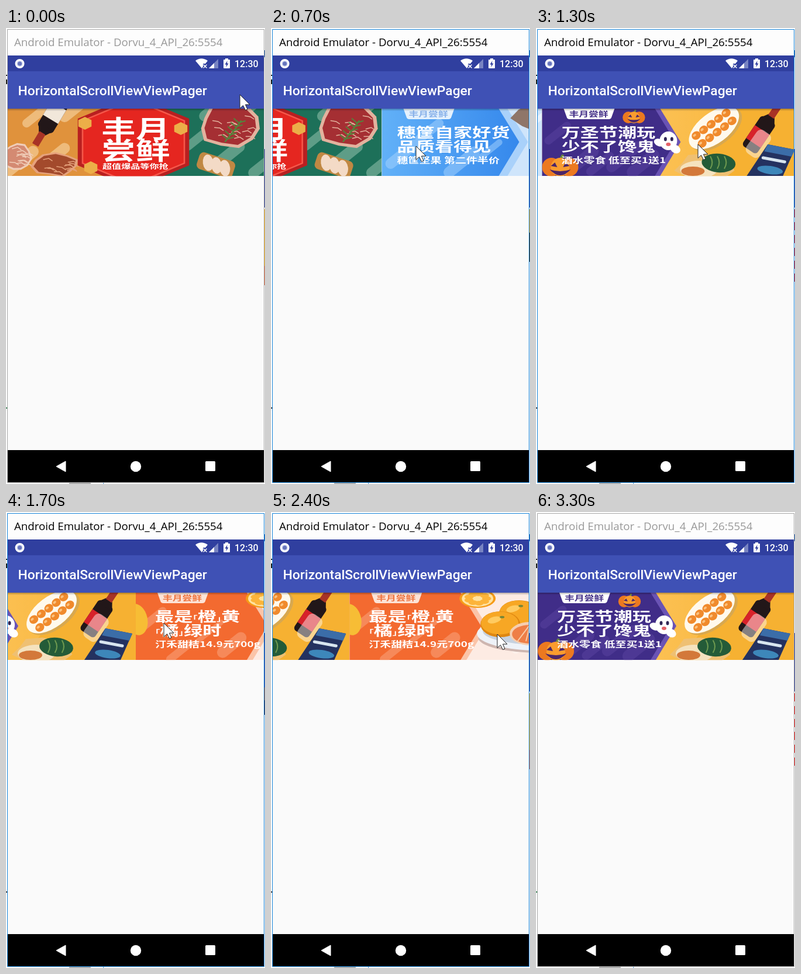
These frames come from a looping animation (443 px wide and 780 px high, 3400 ms). An HTML page:

```html
<!DOCTYPE html>
<html lang="zh-CN">
<head>
<meta charset="utf-8">
<title>HorizontalScrollViewViewPager</title>
<style>
html, body { margin: 0; height: 100%; overflow: hidden; background: #fff }
svg { display: block; width: 100vw; height: 100vh }
.cjk { font-family: "Noto Sans CJK SC", "Noto Sans CJK", sans-serif; font-weight: 700 }
.ui { font-family: Roboto, sans-serif; font-weight: 500; fill: #fff }
.title { font: 18.7px "Open Sans", "Noto Sans", sans-serif }
</style>
</head>
<body>
<svg id="stage" viewBox="0 0 443 780"></svg>
<script>
const LOOP = 3400, STEP = 100, PAGE = 438, HIGH = 115;

// Rules for repeated parts
const list = (n, make) => Array.from({ length: n }, (_, i) => make(i));
const many = (n, make) => list(n, make).join('');
const noise = n => {
  const s = Math.sin(n * 127.1 + 3) * 43758.5;
  return s - Math.floor(s);
};
const smooth = p => {
  p = Math.min(1, Math.max(0, p));
  return p * p * (3 - 2 * p);
};

// Shapes
const rect = (fill, x, y, w, h, more = '') =>
  `<rect x="${x}" y="${y}" width="${w}" height="${h}" fill="${fill}" ${more}/>`;
const shape = (fill, d, more = '') => `<path d="${d}" fill="${fill}" ${more}/>`;
const oval = (fill, x, y, rx, ry = rx, turn = 0, more = '') =>
  `<ellipse rx="${rx}" ry="${ry}" transform="translate(${x} ${y}) rotate(${turn})" fill="${fill}" ${more}/>`;
const line = (color, w, d) =>
  shape('none', d, `stroke="${color}" stroke-width="${w}" stroke-linecap="round"`);
const group = (x, y, turn, body) => `<g transform="translate(${x} ${y}) rotate(${turn})">${body}</g>`;

// Polygon around a centre; reach(i) scales each corner
const ring = (fill, n, x, y, rx, ry, reach = () => 1) =>
  `<polygon fill="${fill}" points="${list(n, i => {
    const a = i / n * 2 * Math.PI - Math.PI / 2;
    return [x + rx * reach(i) * Math.cos(a), y + ry * reach(i) * Math.sin(a)];
  }).join(' ')}"/>`;
const blob = (fill, x, y, rx, ry, seed) => ring(fill, 11, x, y, rx, ry, i => .85 + .25 * noise(seed + i));

// Parts shared by the banners
const arrow = (fill, x) => shape(fill, `M0 0H${x}l35 57l-35 58H0z`);
const streaks = (color, x, width, n, seed) => `<g opacity=".5">${many(n, i => {
  const size = 20 + 25 * noise(seed + i);
  return line(color, 8 + 12 * noise(seed + i * 3),
    `M${x + width * (i + .3) / n} ${HIGH * noise(seed + i * 7)}l${size} ${-size * .8}`);
})}</g>`;

// Banner artwork is shown wider than it was drawn
const words = (x, y, size, text, fill = '#fff') =>
  `<text class="cjk" transform="translate(${x} ${y}) scale(1.4 1)" font-size="${size}" fill="${fill}">${text}</text>`;
const headline = (x, a, b, c) => words(x, 49, 23, a) + words(x, 73, 23, b) + words(x, 93, 13.6, c);
const badge = (fill, color) => shape(fill, 'M37 0h87l-5 14q-1 4-5 4H47q-4 0-5-4z') + words(46, 14, 12, '丰月尝鲜', color);

const bottle = (x, y, turn, label) => group(x, y, turn,
  rect('#221719', -15, -92, 30, 62, 'rx="6"') +
  shape('#221719', 'M-15-36L-6-22H6L15-36') +
  rect('#a83326', -6, -24, 12, 24, 'rx="1"') + rect(label, -15, -78, 30, 27));

const meat = (x, y, rx, ry, fat, lean, seed) =>
  blob(fat, x, y, rx, ry, seed) + blob(lean, x, y, rx * .88, ry * .86, seed) +
  many(12, i => line(fat, 1.5, `M${x + rx * 1.2 * (noise(seed + i) - .5)} ${y + ry * 1.2 * (noise(seed + i * 5) - .5)}l9 ${8 * noise(i) - 6}l6 4`));

function feastPage() {
  return rect('#1d7059', 0, 0, PAGE, HIGH) + rect('#e0923c', 0, 0, 180, HIGH) +
    streaks('#fbe3ba', -10, 130, 4, 5) + streaks('#9fc9b5', 300, 140, 5, 8) +
    bottle(47, 62, 31, '#f1e7da') +
    meat(16, 82, 24, 24, '#f0cdb8', '#d48a72', 2) + meat(82, 96, 40, 20, '#e6a27c', '#a34a2c', 9) +
    ring('#b91f20', 6, 215, 57, 110, 80) + ring('#f6574a', 6, 215, 57, 102, 74) + ring('#e52620', 6, 215, 57, 99, 71) +
    [[296, 34], [132, 25], [142, 101]].map(([x, y]) => ring('#ecae48', 6, x, y, 13, 11)).join('') +
    words(160, 50, 42, '丰月') + words(160, 87, 42, '尝鲜') + words(162, 103, 11.5, '超值爆品等你抢') +
    meat(379, 29, 54, 37, '#e3b29e', '#a52f33', 4) +
    line('#55833c', 2.5, 'M372 56q14-16 27-35') +
    many(5, i => line('#55833c', 2, `M${375 + i * 5} ${52 - i * 7}l-8-7m8 7l11-3`)) +
    group(357, 97, 18, rect('#c08843', -33, -15, 64, 30, 'rx="8"') +
      many(3, i => oval('#f3dac6', i * 15 - 15, 0, 9, 14, -25)));
}

function nutPage() {
  return rect('#cfe5fb', 0, 0, PAGE, HIGH) + arrow('#a9d1fa', 215) + arrow('url(#blue)', 200) +
    streaks('#a7d4fd', 0, 200, 4, 3) + streaks('#fff', 245, 190, 4, 6) +
    blob('#8f7669', 285, 12, 62, 28, 3) + oval('#f4f9fd', 342, 75, 72, 30) +
    many(6, i => oval(i % 2 ? '#b47b49' : '#d5a66e', 304 + i * 15, 72 + 12 * noise(i), 16, 10, 60 * noise(i))) +
    badge('#e4f1fd', '#88b1e9') + headline(26, '穗筐自家好货', '品质看得见', '穗筐坚果 第二件半价');
}

const pumpkin = (x, y, s) => `<g transform="translate(${x} ${y}) scale(${s})">` +
  line('#6b8740', 5, 'M1-14l3-5') +
  [-15, 15, 0].map(dx => oval(dx ? '#ec7920' : '#fa9c2e', dx, 0, 16, 16)).join('') +
  shape('#4d2668', 'M-16-2l7-6l4 8zM16-2l-7-6l-4 8zM-18 4q18 6 36 0q-18 20-36 0') + '</g>';

function ghost(x, y) {
  return oval('#fff', x, y, 15, 16) + oval('#fff', x - 16, y + 3, 9, 6, 25) + oval('#fff', x + 12, y + 14, 9, 7, 30) +
    [-5, 6].map(dx => oval('#302656', x + dx, y - 3, 2.5, 3.5)).join('') + oval('#e56267', x, y + 6, 4, 3);
}

function partyPage() {
  const roll = i => oval('#f08a2c', (i % 5 - 2) * 16, i < 5 ? -8 : 9, 8, 7) + oval('#fbc17d', (i % 5 - 2) * 16 - 2, i < 5 ? -10 : 7, 3, 2);
  return rect('url(#amber)', 0, 0, PAGE, HIGH) + shape('#f6b132', 'M335 0H438V115H240z') +
    arrow('#6a53b4', 202) + arrow('#402d88', 193) + streaks('#5b45a0', 0, 180, 5, 2) +
    badge('#fff', '#443087') + pumpkin(157, 15, .62) + pumpkin(31, 100, 1) +
    headline(33, '万圣节潮玩', '少不了馋鬼', '酒水零食 低至买1送1') + ghost(216, 55) +
    group(294, 33, -37, oval('#d8a84f', 2, 4, 51, 27) + oval('#fff9ec', 0, 0, 50, 26) + many(10, roll)) +
    bottle(405, -6, 214, '#d7222a') +
    group(370, 60, 35, rect('#fff', -14, -24, 28, 48, 'rx="9" opacity=".45"')) +
    blob('#efc072', 278, 102, 48, 25, 6) + oval('#f5e2be', 268, 104, 32, 15) + oval('#d3783a', 258, 107, 20, 8) +
    oval('#245b38', 302, 93, 29, 16, 5) + many(3, i => line('#6f9a50', 2, `M${288 + i * 12} 82q6 10 0 20`)) +
    shape('#243260', 'M386 61l46 9l-20 45h-62z') + shape('#3b6da8', 'M386 61l46 9l-5 12l-47-9z') +
    line('#d8e5ef', 5, 'M378 84l37 7') + oval('#3d87ba', 390, 105, 22, 7, 8);
}

const slice = (x, y, rx, ry) => oval('#f69b17', x, y, rx, ry) + oval('#ffe2a0', x, y, rx * .87, ry * .87) +
  many(9, i => {
    const a = i / 9 * 2 * Math.PI;
    return oval('#fcb43a', x + Math.cos(a) * rx * .5, y + Math.sin(a) * ry * .5, rx * .25, ry * .25);
  });
const fruit = (x, y, r) => oval('#df8711', x, y, r, r * .65) + oval('#f7a724', x - 1, y - 2, r - 2, r * .57) +
  oval('#ffcb60', x - r * .3, y - r * .22, r * .35, r * .16, -15) + oval('#778637', x + 3, y - r * .36, 4, 2);
const peeled = (x, y, r) => oval('#f6ceb0', x, y, r, r * .57) + oval('#ee7e47', x, y + 1, r - 4, r * .46) +
  many(4, i => line('#f8cba7', 2, `M${x} ${y - r * .45}l${r * (i - 1.5) * .4} ${r * .8}`));

function citrusPage() {
  const tick = mark => `<tspan font-size="12">${mark}</tspan>`;
  return rect('#fdebe3', 0, 0, PAGE, HIGH) + streaks('#fff8f3', 235, 190, 5, 4) +
    arrow('#fbc4a8', 200) + arrow('#f36a30', 190) + streaks('#f9a883', 0, 180, 4, 7) +
    oval('#f7bd35', 2, 46, 18, 27, -12) + slice(219, 10, 31, 16) + slice(412, 12, 25, 16) + slice(387, 112, 35, 12) +
    oval('#ceb6b0', 326, 77, 106, 26) + oval('#eef2f8', 325, 70, 107, 29) + oval('#c6d1df', 325, 66, 97, 23) +
    [[290, 35], [354, 36], [258, 54], [364, 58], [403, 52]].map(([x, y]) => fruit(x, y, 34)).join('') +
    peeled(309, 70, 35) + peeled(404, 66, 26) + oval('#ee8248', 358, 83, 19, 7, -8) +
    badge('#fde3d6', '#ef743f') +
    headline(33, `最是${tick('｢')}橙${tick('｣')}黄`, `${tick('｢')}橘${tick('｣')}绿时`, '汀禾甜桔14.9元700g');
}

const chrome =
  rect('#303f9f', 3, 47, 438, 28) + rect('#3f51b5', 3, 74, 438, 64) +
  oval('#c9d0ee', 23.5, 61, 6.5, 6.5, 0, 'stroke="#fff" stroke-width="3"') + oval('#6574bd', 23.5, 61, 3.5) +
  shape('#fff', 'M324 56q10-7.500 21 0l-4 5h-4v5l-2 3z') + line('#fff', 1.5, 'M338 63l5 5m0-5l-5 5') +
  shape('#7884c2', 'M347 69l16-16v16z') + shape('#fff', 'M347 69l9-9v9z') +
  rect('#fff', 372, 54, 11, 15, 'rx="1"') + rect('#fff', 375, 52, 5, 3) +
  shape('#303f9f', 'M378.500 56l-4 6.500h2.500l-.5 4.500l4-6.500H378z') +
  `<text class="ui" x="391" y="67" font-size="16">12:30</text>` +
  `<text class="ui" x="20.6" y="115" font-size="22.8">HorizontalScrollViewViewPager</text>`;

const navBar = rect('#000', 3, 722, 438, 55) +
  shape('#fff', 'M86 750l16-9v18z', 'stroke="#fff" stroke-linejoin="round"') +
  oval('#fff', 222, 750, 9.2) + rect('#fff', 341, 741, 17, 17, 'rx="1.5"');

// Slivers of the desktop around the window
const sliver = (color, y, h) => rect(color, 441, y, 2, h);
const strips = [
  sliver('#f7b21e', 310, 97) + sliver('#e0714a', 407, 33),
  sliver('#f5a81c', 310, 40) + sliver('#3a2a12', 350, 50),
  many(6, i => sliver('#e22', 310 + i * 22, 14)),
  sliver('#a8572f', 300, 22) + sliver('#35263f', 322, 25)
];
const desktop = rect('#2563b0', 441, 38, 2, 12) + rect('#222', 0, 80, 2, 2) + rect('#222', 0, 88, 2, 8) +
  rect('#aaa', 108, 778, 37, 2) + rect('#458bd0', 166, 778, 1, 2) + sliver('#3949a0', 207, 100);

const stage = document.getElementById('stage');
stage.innerHTML = `<defs>
  <linearGradient id="blue"><stop stop-color="#62b1f8"/><stop offset="1" stop-color="#3588ec"/></linearGradient>
  <linearGradient id="amber"><stop offset=".4" stop-color="#fcc256"/><stop offset="1" stop-color="#f7b233"/></linearGradient>
  <linearGradient id="shade" x2="0" y2="1"><stop stop-opacity=".28"/><stop offset="1" stop-opacity="0"/></linearGradient>
  <clipPath id="view"><rect x="3" y="138" width="438" height="115.500"/></clipPath>
  <clipPath id="page"><rect width="438" height="115.500"/></clipPath></defs>
  ${desktop}<g id="strip"></g>${rect('#358050', 0, 649, 2, 2, 'id="mark"')}
  ${rect('#fafafa', 2.5, 2.5, 439, 775, 'id="frame"')}
  ${rect('#fdfdfd', 3, 3, 438, 44)}
  <text id="caption" class="title" x="14" y="31">Android Emulator - Dorvu_4_API_26:5554</text>
  ${chrome}
  <g clip-path="url(#view)"><g id="pages">${[feastPage, nutPage, partyPage, citrusPage].map((draw, i) =>
    `<g transform="translate(${i * PAGE} 0)" clip-path="url(#page)">${draw()}</g>`).join('')}</g></g>
  ${rect('url(#shade)', 3, 138, 438, 4)}${navBar}
  ${shape('#fff', 'M0 0v23.500l5.500-5l4 8l3.500-1.500l-3.500-8H17z', 'id="cursor" stroke="#222"')}`;
const [strip, mark, frame, caption, pages, cursor] =
  ['strip', 'mark', 'frame', 'caption', 'pages', 'cursor'].map(id => document.getElementById(id));

// Each swipe: start, end, pages moved
const swipes = [[456, 900, 1], [1000, 1325, 1], [1500, 1900, 1], [2229, 2700, -1]];
const scroll = t => swipes.reduce((sum, [a, b, n]) => sum + n * PAGE * smooth((t - a) / (b - a)), 0);

// Turning points of the pointer: time, x, y
const turns = [[0, 400, 114], [400, 390, 203], [700, 248, 202], [900, 395, 203], [1000, 395, 203],
  [1300, 277, 199], [1500, 390, 200], [1700, 270, 190], [1900, 370, 136], [2200, 256, 209], [2400, 387, 209], [2600, 460, 212]];

function pointer(t) {
  if (t >= 3100 && t < 3300) return [166, 189];
  const i = turns.findLastIndex(k => k[0] <= t), a = turns[i], b = turns[i + 1];
  if (!b) return a.slice(1);
  const p = smooth((t - a[0]) / (b[0] - a[0]));
  return [1, 2].map(n => a[n] + (b[n] - a[n]) * p);
}

let shown;
function draw(now) {
  const t = Math.floor(now % LOOP / STEP) * STEP;
  const active = t >= 400 && t < 3300;
  pages.setAttribute('transform', `translate(${3 - scroll(t)} 138)`);
  cursor.setAttribute('transform', `translate(${pointer(t)})`);
  frame.setAttribute('stroke', active ? '#1683d8' : '#a5a5a5');
  caption.setAttribute('fill', active ? '#000' : '#999');
  mark.setAttribute('fill', active ? '#333' : '#358050');
  const kind = Math.floor(t / 540) % strips.length;
  if (kind !== shown) strip.innerHTML = strips[shown = kind];
}

const start = performance.now();
function tick() {
  draw(performance.now() - start);
  requestAnimationFrame(tick);
}
tick();
</script>
</body>
</html>
```
